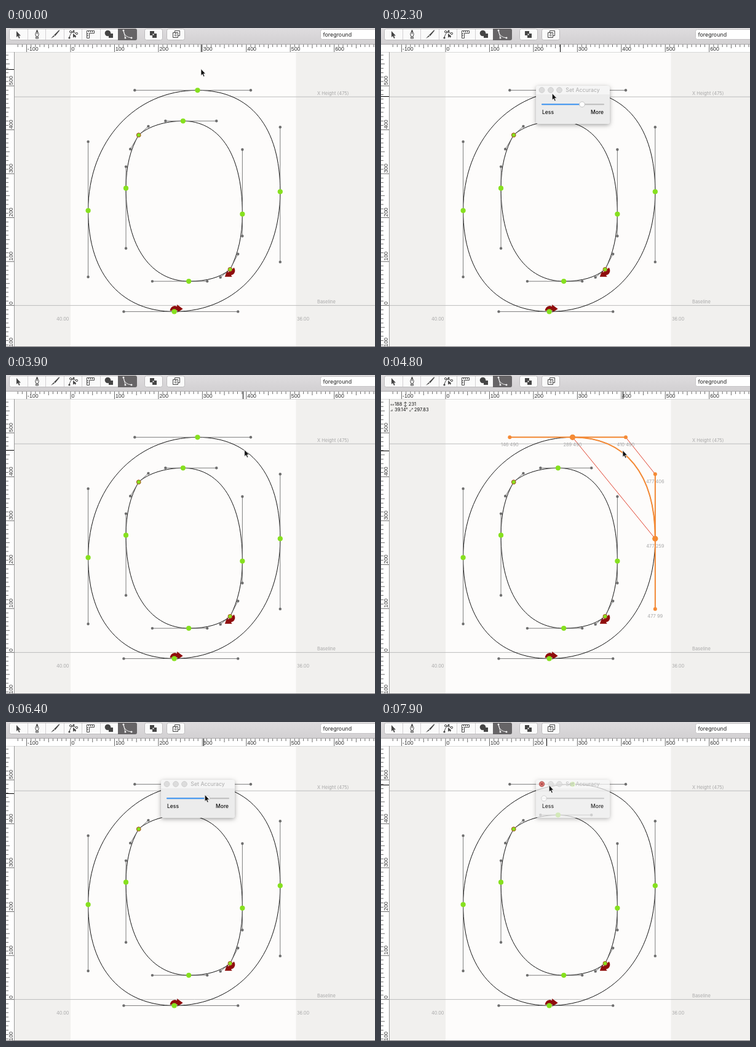
An HTML page with a canvas for the animation above (8000 ms loop, 600 px wide and 519 px high).

```html
<!DOCTYPE html>
<html>
<head>
<meta charset="utf-8">
<style>
html, body { margin: 0; width: 100%; height: 100%; overflow: hidden; background: #f1f0ee; }
canvas { display: block; width: 600px; height: 519px; }
</style>
</head>
<body>
<canvas id="stage"></canvas>
<script>
const LOOP = 8000, STEP = 100, LAG = 50;
const UNIT = 0.7145, ORIGIN_X = 105, ORIGIN_Y = 451.4;
const GREEN = '#86e01e', ORANGE = '#f58a35', GREY = '#a9a9a9', HANDLE = '#6e6e6e', RED = '#e0402c';
const INK = '#454545', PALE = '#fafafa';
const UI = 'Inter, sans-serif', RULER = '"Liberation Sans", sans-serif';

const canvas = document.getElementById('stage');
const ratio = window.devicePixelRatio || 1;
canvas.width = 600 * ratio;
canvas.height = 519 * ratio;
const c = canvas.getContext('2d');

const sx = u => ORIGIN_X + u * UNIT;
const sy = u => ORIGIN_Y - u * UNIT;

// Glyph nodes in font units; a and b are the incoming and outgoing handles
const corner = (x, y, ax, ay, bx, by) =>
  ({ x, y, a: [x + ax, y + ay], b: [x + bx, y + by], corner: true });
const flat = (x, y, a, b) => ({ x, y, a: [x + a, y], b: [x + b, y] });
const steep = (x, y, a, b) => ({ x, y, a: [x, y + a], b: [x, y + b] });

const outer = [
  flat(289, 490, -143, 121), steep(477, 259, 147, -160),
  flat(236, -14, 145, -115), steep(40, 216, -151, 157)
];
const inner = [
  flat(256, 420, 76, -40), corner(155, 388, 22, 20, -19, -32), steep(126, 267, 49, -137),
  flat(269, 55, -83, 42), corner(363, 82, -22, -18, 18, 35), steep(391, 208, -50, 147)
];

// Pointer stops and the moves between them
const REST = [317, 67], LESS = [260, 122], KNOB = [327, 124], CLOSE = [262, 101], CURVE = [393, 123];
const moves = [
  { from: 400, to: 1200, at: LESS }, { from: 1400, to: 2000, at: KNOB },
  { from: 2150, to: 2450, at: CLOSE }, { from: 3100, to: 4100, at: CURVE },
  { from: 4900, to: 5800, at: [281, 60] }, { from: 5900, to: 6600, at: KNOB },
  { from: 6700, to: 7100, at: LESS }, { from: 7250, to: 7550, at: CLOSE },
  { from: 7800, to: 8000, at: [277, 104] }
];

// Each showing of the panel, with the knob drag inside it
const showings = [
  { open: 900, close: 3100, drag: 1400, drop: 2000, before: 265, after: 327 },
  { open: 6300, close: 7800, drag: 6700, drop: 7100, before: 327, after: 265 }
];

const clamp = (v, lo, hi) => Math.min(hi, Math.max(lo, v));
const easeOut = k => k * (2 - k);

function pointer(t) {
  let p = REST;
  for (const { from, to, at } of moves) {
    const k = easeOut(clamp((t - from) / (to - from), 0, 1));
    p = p.map((v, i) => v + (at[i] - v) * k);
  }
  return p;
}

function stroke(color, width) {
  c.strokeStyle = color;
  c.lineWidth = width;
  c.stroke();
}

function line(color, width, ...pts) {
  c.beginPath();
  for (let i = 0; i < pts.length; i += 2) c.lineTo(pts[i], pts[i + 1]);
  stroke(color, width);
}

function dot(x, y, r, fill, ring) {
  c.beginPath();
  c.arc(x, y, r, 0, Math.PI * 2);
  c.fillStyle = fill;
  c.fill();
  if (ring) stroke(ring, 1);
}

function box(x, y, w, h, fill, r = 0, edge) {
  c.beginPath();
  c.roundRect(x, y, w, h, r);
  c.fillStyle = fill;
  c.fill();
  if (edge) stroke(edge, 1);
}

function text(s, x, y, size, color, align = 'left', family = UI) {
  c.font = size + 'px ' + family;
  c.textAlign = align;
  c.fillStyle = color;
  c.fillText(s, x, y);
}

function shape(d, x, y, fill, edge, width = 1, angle = 0) {
  c.save();
  c.translate(x, y);
  c.rotate(angle);
  const p = new Path2D(d);
  if (fill) { c.fillStyle = fill; c.fill(p); }
  if (edge) { c.strokeStyle = edge; c.lineWidth = width; c.stroke(p); }
  c.restore();
}

function toolbar() {
  const shade = c.createLinearGradient(0, 0, 0, 27);
  shade.addColorStop(0, '#dedcde');
  shade.addColorStop(1, '#d2d0d2');
  box(0, 0, 600, 27, shade);
  line('#aaa8aa', 1, 0, 26.5, 600, 26.5);
  box(5.5, 1.5, 207, 18, PALE, 3, '#bdbbbd');
  for (const x of [225.5, 261.5]) box(x, 1.5, 29, 18, PALE, 3, '#bdbbbd');
  for (let i = 1; i < 6; i++) {
    const x = Math.round(5.5 + i * 29.4) + 0.5;
    line('#d2d0d2', 1, x, 2, x, 19);
  }
  box(182, 1, 31, 19, '#666466', [0, 3, 3, 0]);

  shape('M-3-5V5L-.7 3 1 7 2.7 6.3 1 2.5H4Z', 20, 10, INK);
  shape('M0-7L2.8 0 1.5 4H-1.5L-2.8 0ZM-2 5H2V7H-2ZM0-6V0', 50.5, 10, PALE, INK);
  shape('M6.5-7L7-5.5 0 3-2 1.5ZM-2.5 2L-1 3.5-7 7Z', 80, 10, INK);
  shape('M-6 6Q-5-1 1-5M-4-4L7-1', 109, 10, null, INK);
  dot(105, 6, 1.6, PALE, INK);
  dot(110, 5, 1.6, INK);
  dot(115, 9, 1.6, PALE, INK);
  dot(103, 16, 1.6, INK);
  shape('M0 0V7L2 5 4 7 5 4Z', 109, 9, INK);
  shape('M-5.5-5.5H6.5V-1.5H-1.5V6.5H-5.5ZM-2.5-5V-3M.5-5V-3M3.5-5V-3M-5-.5H-3M-5 2.5H-3', 137, 10, null, INK);
  dot(165.5, 8.5, 4.8, INK);
  box(167, 9, 7, 7, INK);
  shape('M-6-6Q-5 5 7 6M-6-6L-3 6', 197, 10, null, '#f0f0f0');
  for (const [x, y] of [[191, 4], [194, 16], [204, 16]]) dot(x, y, 1.5, '#f0f0f0');
  box(234, 5, 7, 7, INK);
  box(238, 9, 7, 7, INK);
  box(238.5, 9.5, 2, 2, PALE);
  box(274.5, 4.5, 8, 8, PALE, 0, INK);
  box(271.5, 7.5, 8, 8, PALE, 0, INK);
  text('4', 275.5, 14.3, 7, INK, 'center');

  box(511.5, 2.5, 100, 16, '#fff', 3, '#c6c4c6');
  text('foreground', 515.5, 13.5, 8.9, '#222');
}

// Draws along x; the vertical ruler is the same one turned a quarter left
function ruler(origin, first, last, thick, mark) {
  for (let u = first; u <= last; u += 10) {
    const x = origin + u * UNIT;
    const major = u % 100 === 0;
    line('#444', 0.8, x, 0, x, major ? thick : u % 50 ? 4 : 6);
    if (major) text(u, x + 1.5, thick - 2.3, 8.8, '#333', 'left', RULER);
  }
  line('#000', 1, mark, 0, mark, thick);
}

function rulers(mx, my) {
  box(0, 27, 600, 12, '#fff');
  box(0, 27, 13, 492, '#fff');
  line('#d8d8d8', 1, 0, 39.5, 600, 39.5);
  line('#999', 1, 13.5, 39, 13.5, 519);
  c.save();
  c.beginPath();
  c.rect(13, 27, 587, 13);
  c.clip();
  c.translate(0, 27);
  ruler(ORIGIN_X, -130, 690, 12, Math.round(mx) + 0.5);
  c.restore();
  c.save();
  c.beginPath();
  c.rect(0, 40, 13, 479);
  c.clip();
  c.rotate(-Math.PI / 2);
  ruler(-ORIGIN_Y, -100, 570, 13, -Math.round(my) - 0.5);
  c.restore();
}

function segment(a, b) {
  c.bezierCurveTo(sx(a.b[0]), sy(a.b[1]), sx(b.a[0]), sy(b.a[1]), sx(b.x), sy(b.y));
}

function contour(nodes) {
  c.beginPath();
  c.moveTo(sx(nodes[0].x), sy(nodes[0].y));
  nodes.forEach((n, i) => segment(n, nodes[(i + 1) % nodes.length]));
  stroke('#111', 1);
}

function handles(n, color, width, r) {
  const ends = [n.a, n.b].map(([x, y]) => [sx(x), sy(y)]);
  line(color, width, ...ends[0], sx(n.x), sy(n.y), ...ends[1]);
  for (const e of ends) dot(...e, r, color);
}

function glyph() {
  box(13, 39, 587, 480, '#f1f0ee');
  box(sx(0), 39, 513 * UNIT, 480, '#fdfcfb');
  for (const u of [475, 0]) line('#bcbcbc', 1, 13, sy(u), 600, sy(u));
  text('X Height (475)', 506, 109, 7.5, GREY);
  text('Baseline', 506, 448, 7.5, GREY);
  text('40.00', 82, 476, 7.4, GREY);
  text('36.00', 473, 476, 7.4, GREY);

  const arrow = 'M-7-1.5Q-6-9 1-9.5L4.5-8.5V-11.5L14-4.5 5 1.5V-2Z';
  [outer[2], inner[4]].forEach((n, i) => shape(arrow, sx(n.x), sy(n.y), '#8f0d0d', null, 1, i * 2.5));
  contour(outer);
  contour(inner);
  const nodes = [...outer, ...inner];
  for (const n of nodes) handles(n, HANDLE, 0.9, 2.2);
  for (const n of nodes)
    dot(sx(n.x), sy(n.y), n.corner ? 3.4 : 4.1, GREEN, n.corner && '#b04a22');
}

function selection() {
  const [a, b] = outer;
  line(RED, 1, sx(a.x), sy(a.y), sx(b.x), sy(b.y));
  line(RED, 1, sx(a.b[0]), sy(a.b[1]), sx(b.a[0]), sy(b.a[1]));
  c.beginPath();
  c.moveTo(sx(a.x), sy(a.y));
  segment(a, b);
  stroke(ORANGE, 2);
  for (const n of [a, b]) {
    handles(n, ORANGE, 2, 3);
    dot(sx(n.x), sy(n.y), 4.6, ORANGE);
    for (const [x, y] of [[n.x, n.y], n.a, n.b])
      text(x + ' ' + y, sx(x), sy(y) + 14.5, 7.5, GREY, 'center');
  }
  const dx = b.x - a.x, dy = a.y - b.y;
  const angle = Math.atan2(dx, dy) * 180 / Math.PI;
  text('↔', 15, 50, 5, '#111');
  text(dx + ' ↕ ' + dy, 22, 50, 7.5, '#111');
  text('⊿', 15, 59, 5, '#111');
  text(angle.toFixed(2) + '° ⤢ ' + Math.hypot(dx, dy).toFixed(2), 22, 59, 7.5, '#111');
}

function panel(knob, alpha, hover) {
  c.save();
  c.globalAlpha = alpha;
  // Shadow only outside the panel, so that it stays clean while fading
  c.save();
  c.beginPath();
  c.rect(0, 0, 600, 519);
  c.roundRect(252, 94, 120, 62, 4);
  c.clip('evenodd');
  c.shadowColor = 'rgba(0,0,0,.35)';
  c.shadowBlur = 7 * ratio;
  c.shadowOffsetY = 2 * ratio;
  box(252, 94, 120, 62, '#ececec', 4);
  c.restore();
  box(252, 94, 120, 14, '#f5f5f5', [4, 4, 0, 0]);
  box(252, 108, 120, 48, '#ececec', [0, 0, 4, 4]);
  for (const x of [261.5, 276, 290]) dot(x, 101, 4.4, '#dcdcdc', '#d0d0d0');
  if (hover) {
    dot(261.5, 101, 4.2, '#dc5a55', '#a8443f');
    shape('M-2-2L2 2M2-2L-2 2', 261.5, 101, null, '#701510');
  }
  text('Set Accuracy', 328, 104.3, 8.8, '#aaa', 'center');
  c.lineCap = 'round';
  line('#bdbdbd', 2, 262, 124.3, 362, 124.3);
  if (knob > 266) line('#3f97f6', 2, 262, 124.3, knob, 124.3);
  dot(knob, 124.3, 4.4, '#fff', '#c4c4c4');
  c.globalAlpha = Math.sqrt(alpha);
  text('Less', 262, 140, '500 8.5', '#111');
  text('More', 362, 140, '500 8.5', '#111', 'right');
  c.restore();
}

function showPanel(t, x) {
  const s = showings.find(s => t >= s.open && t < s.close + 400);
  if (!s) return;
  const knob = t < s.drag ? s.before : t > s.drop ? s.after : clamp(x, 265, 358);
  panel(knob, 1 - clamp((t - s.close) / 400, 0, 1), t > s.close - 300);
}

function draw(t) {
  const [x, y] = pointer(t);
  c.setTransform(ratio, 0, 0, ratio, 0, 0);
  glyph();
  if (t >= 4300 && t < 5400) selection();
  rulers(...pointer(t - LAG));
  line('#77757a', 1, 0, 518.5, 600, 518.5);
  toolbar();
  showPanel(t, x);
  shape('M0-.5V10.5L2.4 8.3 4.2 12.3 6 11.5 4.3 7.6H7.6Z', x, y, '#111', '#fff', 0.7);
}

function tick(now) {
  draw(Math.floor(now % LOOP / STEP) * STEP);
  requestAnimationFrame(tick);
}
draw(0);
requestAnimationFrame(tick);
</script>
</body>
</html>
```
